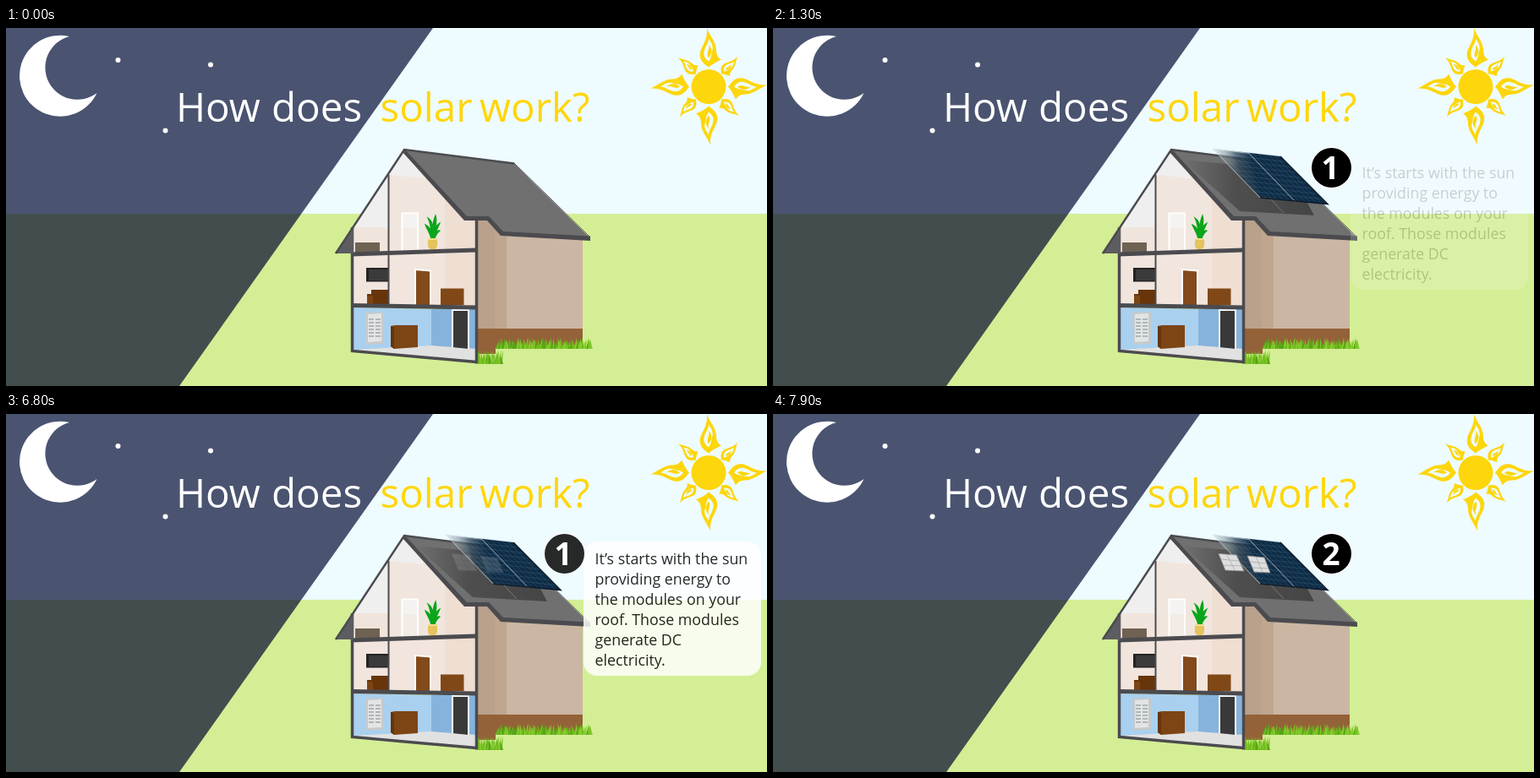
An HTML page for the animation above (8000 ms loop, 900x424 px).

```html
<!DOCTYPE html>
<html lang="en">
<head>
<meta charset="utf-8">
<title>How does solar work?</title>
<style>
  html, body { margin: 0; width: 100%; height: 100%; overflow: hidden; }
  svg { display: block; width: 900px; height: 424px; }
  text { font-family: "Open Sans", "Noto Sans", sans-serif; }
  .title { font-size: 47.5px; }
  .num { font-size: 37px; font-weight: 700; fill: #fff; text-anchor: middle; }
  .note { font-size: 17.8px; fill: #000; }
  .cells { vector-effect: non-scaling-stroke; stroke: #6fa3c8; stroke-opacity: .28; stroke-width: .7; fill: none; }
</style>
</head>
<body>
<svg viewBox="0 0 900 424">
  <defs>
    <path id="ray" fill-rule="evenodd" d="M0-23C-5-27-12-31-10-41C-8-49-1-55-2-69C2-59 9-53 9-43C9-36 13-33 15-32C9-29 4-27 0-23Z
      M0-30C-4-33-7-37-5-43C-4-48 0-51 0-57C4-51 6-47 4-42C3-37 3-34 0-30Z
      M0-34C-4-40 2-43 0-50C5-44 4-39 0-34Z"/>
    <linearGradient id="glass" x1="0" y1="0" x2=".7" y2=".7">
      <stop offset="0" stop-color="#dbe7ec" stop-opacity=".6"/>
      <stop offset=".2" stop-color="#8b969b" stop-opacity=".5"/>
      <stop offset=".45" stop-color="#2b4152" stop-opacity=".75"/>
      <stop offset=".75" stop-color="#0f2c45"/>
    </linearGradient>
    <linearGradient id="shade" x1="0" y1="0" x2="1" y2="0">
      <stop offset="0" stop-color="#404040" stop-opacity="0"/>
      <stop offset=".4" stop-color="#404040" stop-opacity=".7"/>
      <stop offset="1" stop-color="#404040" stop-opacity=".9"/>
    </linearGradient>
  </defs>

  <!-- day and night -->
  <path fill="#eefbff" d="M0 0H900V220H0Z"/>
  <path fill="#d4ee95" d="M0 220H900V424H0Z"/>
  <path fill="#4a5370" d="M0 0H505L349.3 220H0Z"/>
  <path fill="#424e4d" d="M0 220H349.3L205 424H0Z"/>
  <path fill="#fff" d="M75 10A48 48 0 1 0 107.500 77A38 38 0 1 1 75 10Z"/>
  <g fill="#fff"><circle cx="132.500" cy="38" r="3"/><circle cx="242" cy="43.500" r="3"/><circle cx="188.500" cy="121.500" r="3"/></g>
  <g id="sun" fill="#fdd60b" transform="translate(831 69.500)"><circle r="20.500"/></g>

  <g class="title">
    <g fill="#fff"><text x="201" y="111">How</text><text x="314" y="111">does</text></g>
    <g fill="#ffd60a"><text x="442.500" y="111">solar</text><text x="560" y="111">work?</text></g>
  </g>

  <!-- outer walls -->
  <path fill="#b9a18b" d="M557 226H572L579 236V384H557Z"/>
  <path fill="#bfa68f" d="M578 234L593 245V379H578Z"/>
  <path fill="#cbb6a3" d="M592 244L682 248V376H592Z"/>
  <path fill="#946238" d="M557 356H682V376L592 379H579V386H557Z"/>
  <g id="grass"></g>

  <!-- attic -->
  <path fill="#f0e6de" d="M471 146L410 238V268L556 264V226H542Z"/>
  <path fill="#efefef" d="M471 146L410 238V236H452V174L495 178Z"/>
  <path fill="#f0e5dc" d="M411 236H452V267H411Z"/>
  <path fill="#efded2" d="M519 198L542 226H556V263H519Z"/>
  <path fill="#6f6252" d="M413 254H442V266H413Z"/>
  <path fill="#f2ebe6" stroke="#fff" stroke-width="2" d="M468.500 264V219.500H487V263"/>
  <path fill="#f5f3f2" d="M470 221H486V237H470Z"/>
  <path fill="#0aa51a" stroke="#0aa51a" stroke-width="1.200" d="M503 250C501 241 498 239 496 233Q502 236 503 242Q502 231 499 225Q505 229 505 238Q505 228 508 222Q510 229 507 239Q509 233 513 231Q511 236 508 242Q511 239 513 240Q508 244 507 250Z"/>
  <path fill="#e5c35d" d="M499 249H510V254Q511 260 507 262H502Q498 260 499 254Z"/>
  <path fill="#f2dc91" d="M499 249H510V251H499Z"/>

  <!-- living floor -->
  <path fill="#f1e5dd" d="M410 269L556 264V330L410 327Z"/>
  <path fill="#efded2" d="M519 266L556 264V330H519Z"/>
  <path fill="#222" d="M426 284H452V300.500H426Z"/>
  <path fill="#3b3b3b" d="M429 286H452V299H429Z"/>
  <path fill="#673509" d="M432 310H452V327H427V315H432Z"/>
  <path fill="#7d4514" d="M427 317H434V327H427Z"/>
  <path fill="#834a1b" stroke="#fff" stroke-width="2" d="M484 328V286L502 287.500V328"/>
  <path fill="#814817" d="M514 308.500H541.500V328H514Z"/>

  <!-- basement -->
  <path fill="#a9d0ef" d="M410 331L504 333V378L410 383Z"/>
  <path fill="#86b3dc" d="M503 333H556V382H503Z"/>
  <path fill="#e1e1e1" d="M410 381L503 376L556 380V395Z"/>
  <path fill="#c5cacc" d="M425 337L447 336V374L426 375Z"/>
  <path fill="#e3e5e5" d="M428 339L444 338V371L428 372Z"/>
  <path stroke="#a0a5a8" stroke-width="1.500" d="M429 345H435M437 345H443M429 349H435M437 349H443M429 353H435M437 353H443M429 357H435M437 357H443M429 361H435M437 361H443M429 365H435M437 365H443"/>
  <path fill="#7d4514" d="M455 353L460 352H487V378L459 380L455 377Z"/>
  <path fill="#673509" d="M455 353L459 354V380L455 377Z"/>
  <path fill="#393939" stroke="#fff" stroke-width="2" d="M528 378V334H547V380"/>

  <!-- frame and roof -->
  <g fill="none" stroke="#4b4b4f">
    <path stroke-width="2" d="M452.500 174V328"/>
    <path stroke-width="3.500" d="M409.500 236V382.500L556 395.500"/>
    <path stroke-width="3.500" d="M556.500 226V397.500"/>
    <path stroke-width="5" d="M408 268L556 263M408 328.500L556 331"/>
  </g>
  <path fill="#5d5d61" d="M389 267L411 235V267Z"/>
  <path fill="#707070" d="M471 144L601 160.500L690 248L587 243L570 224.500H544Z"/>
  <path fill="none" stroke="#4b4b4f" stroke-width="2.500" d="M390 267L471 144L601 160.500"/>
  <path fill="#4b4b4f" d="M471 143L545 223H571L588 241L691 246.500V252L585 246L569 228H542L469 147Z"/>
  <path fill="none" stroke="#5b5b5e" d="M601 160L690 247"/>

  <g id="panels">
    <path fill="url(#shade)" d="M484 156L560 163L632 207L640 222L552 217Z"/>
    <path stroke="#777" d="M589 203L604 219"/>
    <g transform="matrix(80 9 56 57 520 143)">
      <path fill="url(#glass)" d="M0 0H.53V1H0Z"/>
      <path fill="#0f2c45" d="M.53 0H1V1H.53Z"/>
      <path id="cells" class="cells"/>
    </g>
    <path fill="none" stroke="#e4edf0" stroke-opacity=".6" d="M576 201L520 143L563 148.500L618 206"/>
    <path fill="none" stroke="#0b1a29" stroke-width="1.500" d="M600 152L656 208.500L576 201"/>
  </g>

  <g id="boxes" fill="#dedede" stroke="#969696" stroke-width=".8">
    <path d="M527 165.500L548 167L557 186L535 185Z"/>
    <path d="M561 168L581 170L588 188L569 187Z"/>
    <path fill="none" stroke="#aaa" d="M537 167L546 185M530 172L551 174M533 179L554 180M571 169L579 187M564 175L584 177M567 182L586 183"/>
  </g>

  <g id="note">
    <rect x="683" y="151" width="210" height="159" rx="16" fill="#fff"/>
    <g class="note">
      <text x="696.500" y="178">It’s starts with the sun</text>
      <text x="696.500" y="202">providing energy to</text>
      <text x="696.500" y="226">the modules on your</text>
      <text x="696.500" y="250">roof. Those modules</text>
      <text x="696.500" y="274">generate DC</text>
      <text x="696.500" y="298">electricity.</text>
    </g>
  </g>
  <g id="one"><circle cx="660.500" cy="165.500" r="25" fill="#fff"/><circle cx="660.500" cy="165.500" r="23.500"/><text class="num" x="659" y="179">1</text></g>
  <g id="two"><circle cx="660.500" cy="165.500" r="25" fill="#fff"/><circle cx="660.500" cy="165.500" r="23.500"/><text class="num" x="660" y="179">2</text></g>
</svg>

<script>
const $ = id => document.getElementById(id);

// sun rays: long ones upright, short ones on the diagonals
let rays = '';
for (let i = 0; i < 8; i++) {
  const size = i % 2 ? 'translate(0 -7) scale(.62)' : '';
  rays += `<use href="#ray" transform="rotate(${i * 45}) ${size}"/>`;
}
$('sun').innerHTML += rays;

// solar cells
let grid = '';
for (let i = 0; i <= 12; i++) grid += `M${i / 12} 0V1`;
for (let i = 0; i <= 9; i++) grid += `M0 ${i / 9}H1`;
$('cells').setAttribute('d', grid);

// grass
let seed = 7;
const rand = () => (seed = seed * 16807 % 2147483647) / 2147483647;
const greens = ['#72bd1c', '#57a51a', '#86cc2c'];
function blades(x0, x1, base, height) {
  let out = '';
  for (let x = x0; x < x1; x += 1.1) {
    const h = height * (.55 + rand() * .45), lean = rand() * 5 - 2.5;
    const color = greens[Math.floor(rand() * 3)];
    out += `<path fill="${color}" d="M${x - 1.6} ${base}L${x + lean} ${base - h}L${x + 1.6} ${base}Z"/>`;
  }
  return out;
}
$('grass').innerHTML = blades(580, 693, 380, 14) + blades(559, 587, 398, 17);

// every fade takes six steps of 100 ms
function draw(now) {
  const step = Math.floor(now % 8000 / 100);
  const fade = first => Math.min(1, Math.max(0, (step - first + 1) / 6));
  const show = (id, value) => $(id).setAttribute('opacity', value);
  show('panels', fade(1));
  show('one', fade(7) - fade(68));
  show('note', fade(13) - fade(68));
  show('boxes', fade(68));
  show('two', fade(74));
}

const start = performance.now();
function tick() {
  draw(performance.now() - start);
  requestAnimationFrame(tick);
}
tick();
</script>
</body>
</html>
```
